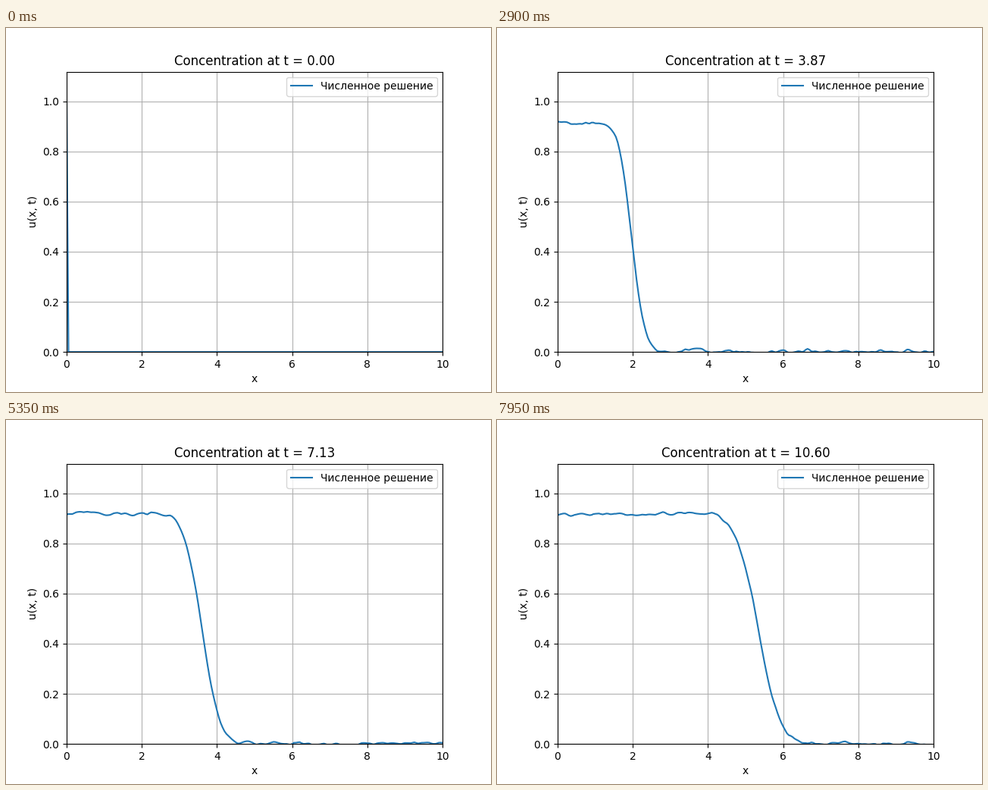
Recreate the animation shown at these times as a matplotlib script. Size 640 px wide and 480 px high, loop 8000 ms.

```python
import numpy as np
import matplotlib.pyplot as plt
from matplotlib.animation import FuncAnimation

FRAMES, INTERVAL = 160, 50
LENGTH, CELLS = 10, 200
DT, SPEED, DIFFUSION = 1 / 15, 0.5, 0.01
NOISE, DAMPING = 0.0028, 0.95

x = np.linspace(0, LENGTH, CELLS + 1)
dx = x[1] - x[0]
courant = SPEED * DT / dx
# the upwind step already spreads the front; add only the remainder
spread = DIFFUSION * DT / dx**2 - courant * (1 - courant) / 2


def smooth(u, k):
    p = np.pad(u, 1, mode="edge")
    return u + k * (p[2:] - 2 * u + p[:-2])


def step(u):
    left = np.concatenate(([u[0]], u[:-1]))
    return smooth(u - courant * (u - left), spread)


def solve():
    rng = np.random.default_rng(12)
    front = np.where(x == 0, 1.0, 0.0)
    ripple = np.zeros_like(x)
    states = [front]
    for _ in range(FRAMES - 1):
        front = step(front)
        kick = smooth(NOISE * rng.standard_normal(x.size), 0.25)
        ripple = DAMPING * step(ripple) + kick
        states.append(front + ripple)
    return states


states = solve()

fig, ax = plt.subplots(figsize=(6.4, 4.8), dpi=100)
line, = ax.plot(x, states[0], label="Численное решение")
ax.set_xlim(0, LENGTH)
ax.set_ylim(0, 1.118)
ax.set_xlabel("x")
ax.set_ylabel("u(x, t)")
title = ax.set_title("Concentration at t = 0.00")
ax.grid(True)
ax.legend(loc="upper right")


def update(i):
    line.set_ydata(states[i])
    title.set_text(f"Concentration at t = {i * DT:.2f}")
    return line, title


anim = FuncAnimation(fig, update, frames=FRAMES, interval=INTERVAL,
                     repeat=True, repeat_delay=0)
plt.show()
```
